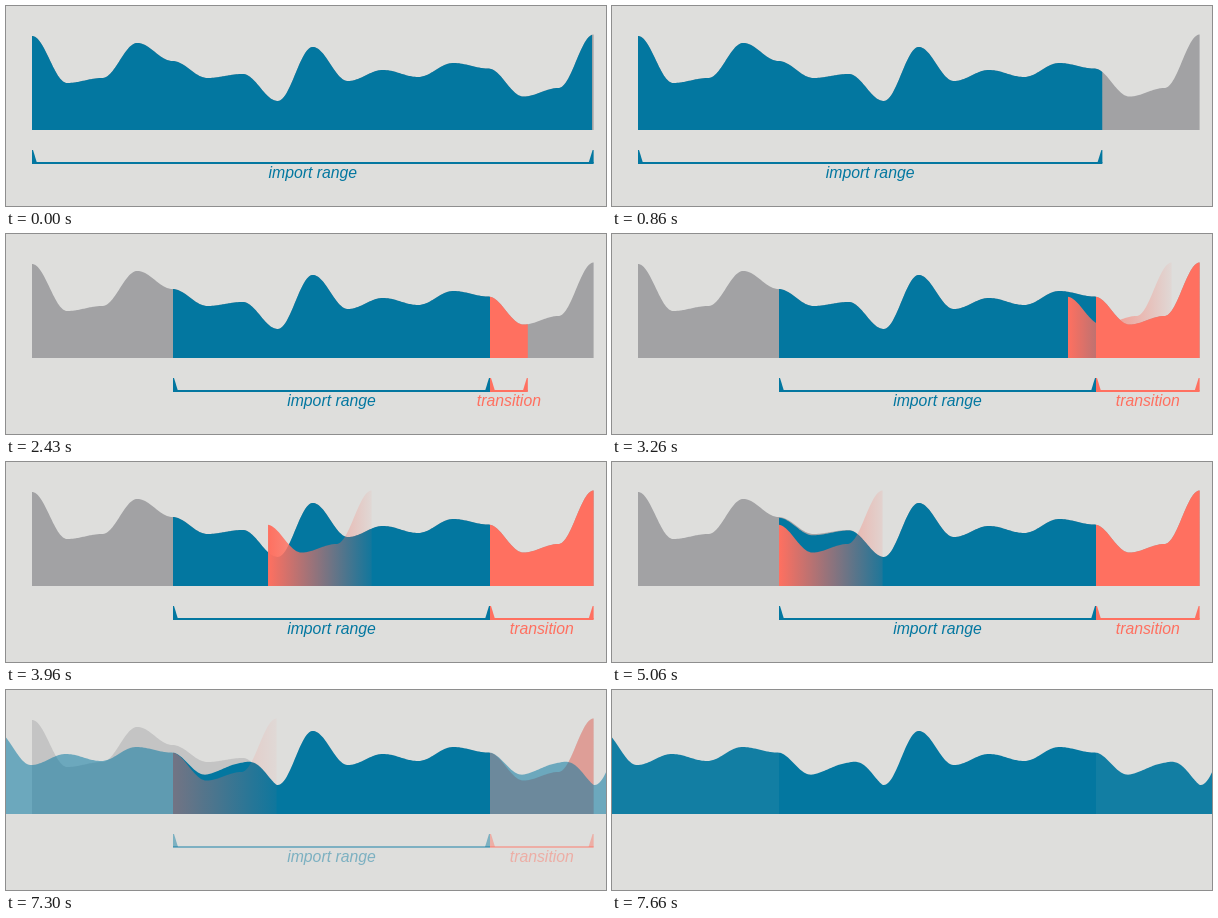
An HTML page with a canvas for the animation above (8 s loop, 600 by 200 pixels).

```html
<!DOCTYPE html>
<html lang="en">
<head>
<meta charset="utf-8">
<title>Import range with transition</title>
<style>
html, body { margin: 0; width: 100%; height: 100%; overflow: hidden; background: #dededc; }
canvas { display: block; }
</style>
</head>
<body>
<canvas id="stage" width="600" height="200"></canvas>
<script>
const ctx = document.getElementById('stage').getContext('2d');
const LOOP = 8000, BASE = 124;
const LEFT = 26, START = 167, END = 484, RIGHT = 587.6;
const SPAN = END - START, FADE = RIGHT - END;
const BG = '#dededc', GRAY = '#a2a2a4', BLUE = '#0377a0', RED = '#ff7060';
const heights = [30, 77, 72, 37, 55, 72, 68, 95, 41, 75, 64, 71, 57, 62.5, 90.5, 82, 28.5];
const STEP = (RIGHT - LEFT) / (heights.length - 1);

const clamp = v => Math.max(0, Math.min(1, v));
const mix = (a, b, p) => a + (b - a) * p;
const ramp = (t, from, to) => clamp((t - from) / (to - from));

function wave(x) {
  const u = clamp((x - LEFT) / (RIGHT - LEFT)) * (heights.length - 1);
  const i = Math.min(Math.floor(u), heights.length - 2);
  return mix(heights[i], heights[i + 1], (1 - Math.cos((u - i) * Math.PI)) / 2);
}

// Range wave whose first part is cross-faded with the transition
function blended(x, amount) {
  const weight = amount * (1 - clamp((x - START) / FADE));
  return mix(wave(x), wave(x + SPAN), weight);
}

function area(fn, x0, x1, fill, alpha = 1, shift = 0) {
  if (x1 <= x0 || alpha <= 0) return;
  ctx.globalAlpha = alpha;
  ctx.fillStyle = fill;
  ctx.beginPath();
  ctx.moveTo(x0 + shift, BASE);
  for (let x = x0; x < x1; x++) ctx.lineTo(x + shift, fn(x));
  ctx.lineTo(x1 + shift, fn(x1));
  ctx.lineTo(x1 + shift, BASE);
  ctx.fill();
}

function bracket(x0, x1, label, color, alpha) {
  ctx.globalAlpha = alpha;
  ctx.fillStyle = color;
  ctx.fillRect(x0, 156, x1 - x0, 2);
  for (const [x, dir] of [[x0, 1], [x1, -1]]) {
    ctx.beginPath();
    ctx.moveTo(x, 144);
    ctx.lineTo(x + dir, 144);
    ctx.lineTo(x + dir * 5, 157);
    ctx.lineTo(x, 157);
    ctx.fill();
  }
  ctx.fillText(label, (x0 + x1) / 2, 172);
}

function draw(t) {
  const trimRight = ramp(t, 80, 912), trimLeft = ramp(t, 912, 2040);
  const left = mix(LEFT, START, trimLeft), right = mix(RIGHT, END, trimRight);
  const fillLeft = trimLeft > 0 && trimLeft < 1 ? Math.max(LEFT, left - 1) : left;
  const redEnd = mix(END, RIGHT, ramp(t, 2127, 2960));
  const copyX = -SPAN * ramp(t, 3160, 4304);
  const morph = ramp(t, 4850, 6850);
  const fade = ramp(t, 6850, 7660), rest = 1 - fade;
  const range = x => blended(x, morph);

  ctx.globalAlpha = 1;
  ctx.fillStyle = BG;
  ctx.fillRect(0, 0, 600, 200);

  area(wave, LEFT, RIGHT, GRAY, rest);
  area(wave, END, redEnd, RED, rest);
  for (const side of [-1, 1]) area(range, START, END, BLUE, 0.93 * fade, side * SPAN);
  area(range, fillLeft, mix(RIGHT - 1.6, END, trimRight), BLUE);

  if (t >= 3160) {
    const glow = ctx.createLinearGradient(END + copyX, 0, RIGHT + copyX, 0);
    const tail = mix(0.06, 0.11, ramp(t, 4304, 4500));
    glow.addColorStop(0, RED);
    glow.addColorStop(1, `rgba(255, 112, 96, ${tail})`);
    area(wave, END, RIGHT, glow, rest, copyX);
  }

  bracket(left, right, 'import range', BLUE, rest);
  if (redEnd > END) bracket(END, redEnd, 'transition', RED, rest);
}

function frame(now) {
  draw(now % LOOP);
  requestAnimationFrame(frame);
}

ctx.font = 'italic 15.8px "Liberation Sans", Arial, sans-serif';
ctx.textAlign = 'center';
draw(0);
requestAnimationFrame(frame);
</script>
</body>
</html>
```
